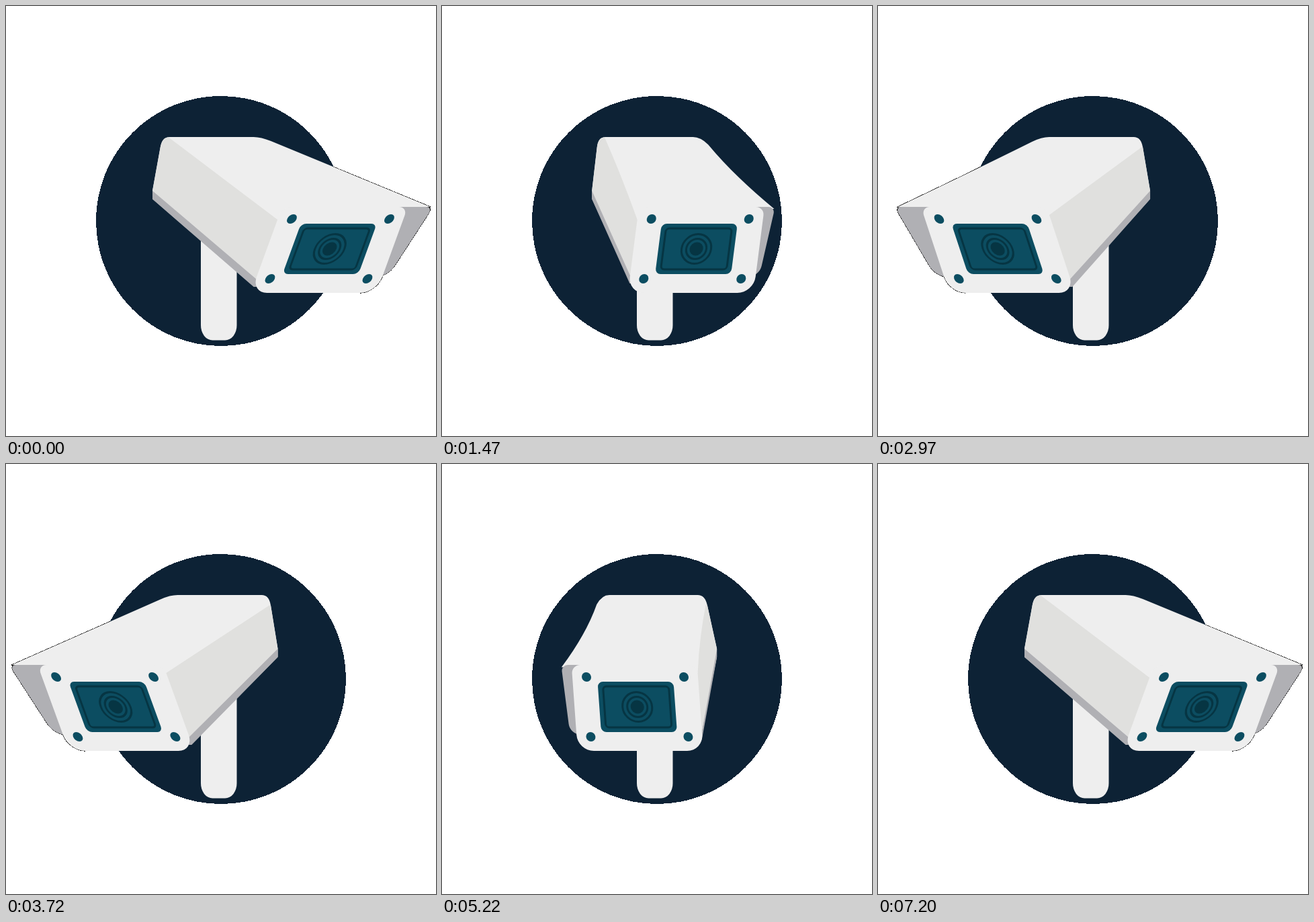
An HTML page that plays this animation: 640 px wide and 640 px high, repeating every 7.26 s.

```html
<!DOCTYPE html>
<html lang="en">
<head>
<meta charset="utf-8">
<title>Security camera</title>
<style>
  html, body { margin: 0; width: 100%; height: 100%; overflow: hidden; background: #fff; }
  svg { display: block; width: 100vw; height: 100vh; }
  .shell { fill: #eee; }
  .side { fill: #e0e0de; }
  .under { fill: #b0b0b4; }
  .glass { fill: #0c4d61; }
  .dark { fill: #063543; }
  .ring { fill: none; stroke: #063543; stroke-width: 3; }
  .crisp { shape-rendering: crispEdges; }
  .edge { stroke: #111; stroke-width: 1.3; }
</style>
</head>
<body>
<svg viewBox="0 0 640 640">
  <g class="edge crisp">
    <use href="#body"/>
    <use href="#hood"/>
    <path id="rim" fill="none" d="M-93.5 41.5A24 24 0 0 0-69.5 65.5M69.5 65.5A24 24 0 0 0 93.5 41.5"/>
  </g>
  <circle class="crisp" cx="320" cy="320" r="186" fill="#0d2235"/>
  <path class="shell" d="M290 320H343.5V475A17.5 22 0 0 1 326 497.5H307.5A17.5 22 0 0 1 290 475Z"/>
  <path id="body" class="shell"/>
  <path id="side" class="side"/>
  <path id="strip" class="under"/>
  <path id="hood" class="under"/>
  <g id="face">
    <path class="shell" d="M-80.5-62.5H80.5A13 13 0 0 1 93.5-49.5V41.5A24 24 0 0 1 69.5 65.5H-69.5A24 24 0 0 1-93.5 41.5V-49.5A13 13 0 0 1-80.5-62.5Z"/>
    <g class="glass">
      <circle cx="-72.5" cy="-44.5" r="7"/>
      <circle cx="72.5" cy="-44.5" r="7"/>
      <circle cx="-72.5" cy="44.5" r="7"/>
      <circle cx="72.5" cy="44.5" r="7"/>
      <rect x="-56.5" y="-37.5" width="113" height="75" rx="8"/>
    </g>
    <rect class="ring" x="-49" y="-30.5" width="98" height="61" rx="5"/>
    <circle class="ring" r="22"/>
    <circle class="ring" r="15"/>
    <circle class="dark" r="10"/>
  </g>
</svg>
<script>
const SWEEP = 3600, LOOP = 7260, STEP = 30;
const part = Object.fromEntries(
  ['body', 'side', 'strip', 'hood', 'face', 'rim'].map(id => [id, document.getElementById(id)]));

// cubic-bezier(.5, 0, .5, 1)
function ease(u) {
  let lo = 0, hi = 1;
  for (let i = 0; i < 24; i++) {
    const s = (lo + hi) / 2;
    if (1.5 * s * (1 - s) + s ** 3 < u) lo = s; else hi = s;
  }
  return lo * lo * (3 - 2 * lo);
}

const pt = (x, y) => `${x.toFixed(2)} ${y.toFixed(2)} `;
const poly = points => 'M' + points.map(p => pt(...p)).join('L') + 'Z';

// f: 0 = turned fully right, 1 = fully left
function pose(f) {
  const near = f < .5 ? -1 : 1;
  const turn = Math.abs(2 * f - 1);
  const open = turn < .08;

  const cx = 481.75 - 319 * f, skew = -.365 + .73 * f;
  const faceMatrix = `matrix(1 0 ${skew} 1 ${cx} 361.5)`;
  part.face.setAttribute('transform', faceMatrix);
  part.rim.setAttribute('transform', faceMatrix);
  const nearEdge = (y, inset = 0) => cx + near * (93.5 - inset) + skew * (y - 361.5);

  const hoodX = 535.8 - 432 * f, hoodSkew = -.65 + 1.3 * f;
  part.hood.setAttribute('transform', `matrix(${-near} 0 ${hoodSkew} 1 ${hoodX} 299)`);
  part.hood.setAttribute('d', (open ? 'M-84 104Q-99.8 104-99.8 88V10Q-99.8 0-90 0' : 'M0 104V0') +
    'H89.8A10 10 0 0 1 99.8 10V88A16 16 0 0 1 83.8 104Z');

  const lost = 10 * (1 + Math.abs(hoodSkew) - Math.hypot(1, hoodSkew));
  const tip = [hoodX - near * (100.5 - lost), 303.5 - 4.5 * turn];

  // Rear corners: far side, then near side
  const far = [312 - near * (75.5 - 8 * turn), 195];
  const dx = tip[0] - far[0], dy = tip[1] - far[1], len = Math.hypot(dx, dy);
  const bow = 10 * (1 - turn) * near / len;
  const top = 312 + near * 79.5;
  const low = near < 0 ? 218 + 16 * f : 404.5 + 11.5 * (1 - f);
  const rearX = y => top + (low - top) * (y - 195) / 80;
  const round = 'Q' + pt(top, 195) + pt(rearX(210), 210);
  const y2 = 418 - 12 * (1 - turn) ** 2, y1 = y2 - 12;

  part.body.setAttribute('d',
    'M' + pt(...tip) +
    'Q' + pt(far[0] + dx / 2 + dy * bow, 195 + dy / 2 - dx * bow) +
    pt(far[0] + dx / len * 16, 195 + dy / len * 16) +
    'Q' + pt(...far) + pt(far[0] + near * 11, 195) +
    'L' + pt(top - near * 11, 195) + round +
    'L' + pt(low, 275) +
    (open ? 'L' + pt(hoodX + near * 99, 304) : 'L' + pt(low, 287)) +
    'L' + pt(nearEdge(y2, 3), y2) + 'L' + pt(cx, 400) + 'L' + pt(cx, 301) + 'Z');

  const start = near < 0 ? [242, 195.5] : [392.5, 210];
  const frontY = 314.5 - 3.5 * near, front = [nearEdge(frontY), frontY];
  const bend = [(start[0] + front[0]) / 2 - near * 6 * (1 - turn) ** 2, (start[1] + front[1]) / 2];
  part.side.setAttribute('d', open ? '' :
    'M' + pt(...start) + (near < 0 ? round : 'L' + pt(rearX(210), 210)) +
    'L' + pt(low, 275) + 'L' + pt(nearEdge(y1), y1) +
    'L' + pt(nearEdge(y1, 4), y1) + 'L' + pt(nearEdge(frontY, 4), frontY) +
    'L' + pt(...front) + 'Q' + pt(...bend) + pt(...start) + 'Z');
  part.strip.setAttribute('d', open ? '' : poly([
    [low, 275], [low, 287.5], [nearEdge(y2, 1), y2], [nearEdge(y2, 8), y2],
    [nearEdge(y1, 8), y1], [nearEdge(y1), y1]]));
}

let began;
function tick(now) {
  began ??= now;
  const t = Math.min(2 * SWEEP, Math.floor((now - began) % LOOP / STEP) * STEP);
  pose(ease(1 - Math.abs(t - SWEEP) / SWEEP));
  requestAnimationFrame(tick);
}
pose(0);
requestAnimationFrame(tick);
</script>
</body>
</html>
```
